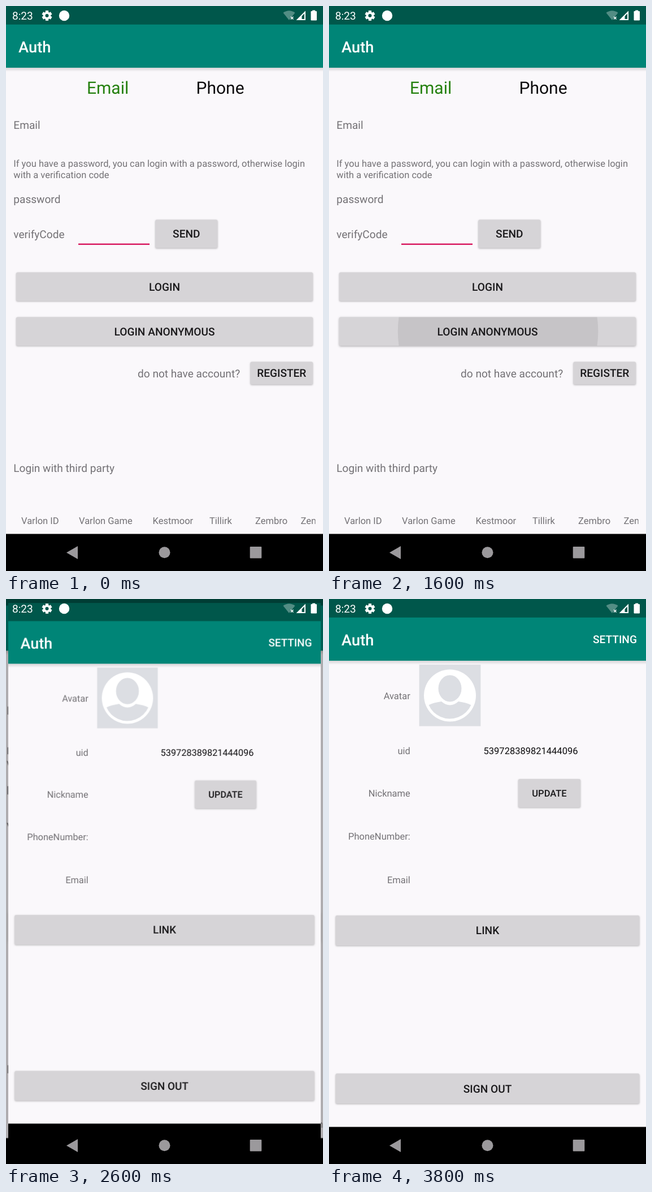
Animation, 561 px wide and 998 px high, one loop 3.9 s. Source, as an HTML page with a canvas:

```html
<!DOCTYPE html>
<html lang="en">
<head>
<meta charset="utf-8">
<title>Auth</title>
<style>
  html, body { margin: 0; width: 100%; height: 100%; overflow: hidden; background: #000; }
  canvas { display: block; }
</style>
</head>
<body>
<canvas id="stage" width="561" height="998"></canvas>
<script>
const W = 561, H = 998, LOOP = 3900, STEP = 100;
const SMALL = 16.5, BODY = 19.1;
const COLOR = {
  page: '#faf8fb', bar: '#008577', status: '#00574b', accent: '#d81b60',
  button: '#d6d4d7', label: '#737175', ink: '#19181a', avatar: '#dcdee3', nav: '#9b999c'
};
const RIPPLE_START = 1550, RIPPLE_TIME = 225;
const OPEN_START = 2442, OPEN_TIME = 400;

const stage = document.getElementById('stage').getContext('2d');
const makeLayer = () => {
  const canvas = document.createElement('canvas');
  canvas.width = W;
  canvas.height = H;
  return canvas.getContext('2d');
};
const loginLayer = makeLayer(), profileLayer = makeLayer();

const clamp = v => Math.max(0, Math.min(1, v));
const mix = (a, b, p) => a + (b - a) * p;
const cubic = (a, b, c, d, u) => {
  const v = 1 - u;
  return v * v * v * a + 3 * v * v * u * b + 3 * v * u * u * c + u * u * u * d;
};

// Solves one Bezier segment for x and returns its y.
function curve(x, xs, ys) {
  let lo = 0, hi = 1;
  for (let i = 0; i < 24; i++) {
    const mid = (lo + hi) / 2;
    if (cubic(...xs, mid) < x) lo = mid; else hi = mid;
  }
  return cubic(...ys, lo);
}
const fastOutSlowIn = x => curve(x, [0, 0.4, 0.2, 1], [0, 0, 1, 1]);
const extraSlowIn = x => x < 1 / 6
  ? curve(x, [0, 0.05, 0.1333, 1 / 6], [0, 0, 0.06, 0.4])
  : curve(x, [1 / 6, 0.2083, 0.25, 1], [0.4, 0.82, 1, 1]);

function text(c, str, x, y, size, { color = COLOR.label, align = 'left', weight = 400 } = {}) {
  c.font = `${weight} ${size}px Roboto, sans-serif`;
  c.textRendering = 'geometricPrecision';
  c.textAlign = align;
  c.fillStyle = color;
  c.fillText(str, x, y);
}

function rect(c, color, x, y, w, h) {
  c.fillStyle = color;
  c.fillRect(x, y, w, h);
}

function disc(c, color, x, y, r) {
  c.fillStyle = color;
  c.beginPath();
  c.arc(x, y, r, 0, 7);
  c.fill();
}

function polygon(c, ...points) {
  c.beginPath();
  points.forEach(([x, y]) => c.lineTo(x, y));
  c.closePath();
}

function button(c, label, x, y, w, h, { size = BODY, press = 0, ripple } = {}) {
  c.save();
  c.shadowColor = `rgba(0,0,0,${mix(0.27, 0.36, press)})`;
  c.shadowBlur = mix(3, 5, press);
  c.shadowOffsetY = mix(1, 1.8, press);
  c.fillStyle = COLOR.button;
  c.beginPath();
  c.roundRect(x, y, w, h, 2.5);
  c.fill();
  c.shadowColor = 'transparent';
  if (ripple) {
    c.clip();
    disc(c, 'rgba(0,0,0,.075)', ripple.x, y + h / 2, ripple.r);
  }
  c.restore();
  text(c, label, x + w / 2, y + h / 2 + size * 0.355, size,
    { color: COLOR.ink, align: 'center', weight: 500 });
}

function windowFrame(c) {
  rect(c, COLOR.page, 0, 0, W, H);
  const shade = c.createLinearGradient(0, 109, 0, 116);
  shade.addColorStop(0, 'rgba(0,0,0,.15)');
  shade.addColorStop(1, 'rgba(0,0,0,0)');
  rect(c, shade, 0, 109, W, 7);
  rect(c, COLOR.bar, 0, 0, W, 109);
  rect(c, COLOR.status, 0, 0, W, 32.7);
  rect(c, '#000', 0, 932.5, W, H - 932.5);
  text(c, 'Auth', 22, 81.5, 27.3, { color: '#fff', weight: 500 });
}

function drawLogin(c, t) {
  windowFrame(c);
  text(c, 'Email', 143, 155, 30, { color: '#24800e' });
  text(c, 'Phone', 336.5, 155, 30, { color: '#0c0b0d' });
  text(c, 'Email', 13.3, 217, BODY);
  text(c, 'If you have a password, you can login with a password, otherwise login', 13.3, 284, SMALL);
  text(c, 'with a verification code', 13.3, 303.5, SMALL);
  text(c, 'password', 13.3, 348, BODY);
  text(c, 'verifyCode', 13.3, 410, BODY);
  rect(c, COLOR.accent, 128, 419.5, 126, 2.5);
  if (t >= 500 && t < 1050) rect(c, COLOR.accent, 127.6, 384, 2.6, 32.5);

  button(c, 'SEND', 264.3, 377.4, 110, 50.2);
  button(c, 'LOGIN', 18, 470.5, 525, 50.5);
  const age = clamp((t - RIPPLE_START) / RIPPLE_TIME);
  const grow = fastOutSlowIn(age);
  button(c, 'LOGIN ANONYMOUS', 18, 549.5, 525, 50.5, {
    press: clamp(age * 2),
    ripple: age > 0 && { x: mix(303, 280.5, grow), r: mix(158, 268, grow) }
  });
  text(c, 'do not have account?', 233, 655.5, BODY);
  button(c, 'REGISTER', 432.5, 628.5, 110.5, 40);
  text(c, 'Login with third party', 13.3, 823, BODY);

  c.save();
  c.beginPath();
  c.rect(13, 890, 534.5, 40);
  c.clip();
  [['Varlon ID', 27], ['Varlon Game', 129], ['Kestmoor', 259.5],
   ['Tillirk', 360], ['Zembro', 441], ['Zembro Game', 521.5]]
    .forEach(([name, x]) => text(c, name, x, 914.5, SMALL));
  c.restore();
}

function drawAvatar(c) {
  rect(c, COLOR.avatar, 159.6, 116, 108.8, 108.6);
  disc(c, '#fff', 214, 170.5, 46);
  c.fillStyle = COLOR.avatar;
  c.beginPath();
  c.ellipse(214, 158, 20.5, 23.5, 0, 0, 7);
  c.fill();
  c.beginPath();
  c.arc(214, 170.5, 41, 0.42, Math.PI - 0.42);
  c.quadraticCurveTo(185, 183, 199, 181);
  c.quadraticCurveTo(214, 194, 229, 181);
  c.quadraticCurveTo(243, 183, 251.4, 187.2);
  c.fill();
}

function drawProfile(c) {
  windowFrame(c);
  text(c, 'SETTING', 506, 78.3, BODY, { color: '#fff', align: 'center', weight: 500 });
  drawAvatar(c);
  [['Avatar', 177], ['uid', 274], ['Nickname', 349], ['PhoneNumber:', 425.3], ['Email', 501.8]]
    .forEach(([name, y]) => text(c, name, 143.8, y, SMALL, { align: 'right' }));
  text(c, '539728389821444096', 357, 274, SMALL, { color: '#0c0b0d', align: 'center' });
  button(c, 'UPDATE', 335, 318, 110, 50, { size: SMALL });
  button(c, 'LINK', 11.7, 559, 537.6, 53);
  button(c, 'SIGN OUT', 11.7, 838.3, 537.6, 53);
}

function drawGear(c, x, y) {
  c.save();
  c.translate(x, y);
  for (let i = 0; i < 6; i++) {
    c.rotate(Math.PI / 3);
    rect(c, '#fff', -2.6, -8.9, 5.2, 5);
  }
  c.strokeStyle = '#fff';
  c.lineWidth = 3.8;
  c.beginPath();
  c.arc(0, 0, 4.9, 0, 7);
  c.stroke();
  c.restore();
}

function drawSystemBars(c) {
  text(c, '8:23', 11, 24, BODY, { color: '#fff' });
  drawGear(c, 72.5, 17);
  disc(c, '#fff', 103, 17, 9.2);

  c.fillStyle = 'rgba(255,255,255,.32)';
  c.beginPath();
  c.moveTo(501, 25);
  c.lineTo(490.5, 12);
  c.quadraticCurveTo(501, 4.5, 511.5, 12);
  c.closePath();
  c.fill();
  c.strokeStyle = '#fff';
  c.lineWidth = 1.5;
  c.beginPath();
  c.moveTo(504, 19);
  c.lineTo(508.5, 23.5);
  c.moveTo(508.5, 19);
  c.lineTo(504, 23.5);
  c.stroke();

  c.lineWidth = 2;
  polygon(c, [516, 24], [529, 24], [529, 11]);
  c.stroke();
  polygon(c, [516, 24], [523.5, 24], [523.5, 16.5]);
  c.fillStyle = '#fff';
  c.fill();

  rect(c, '#fff', 542.2, 7.5, 5, 3);
  c.beginPath();
  c.roundRect(539.5, 9, 10.5, 16.5, 1.2);
  c.fill();

  c.fillStyle = COLOR.nav;
  polygon(c, [107, 965.5], [127, 954], [127, 977]);
  c.fill();
  disc(c, COLOR.nav, 280.5, 965.3, 10);
  c.beginPath();
  c.roundRect(431.7, 955, 20.6, 20.6, 1);
  c.fill();
}

function place(layer, scale, alpha = 1) {
  stage.save();
  stage.globalAlpha = alpha;
  stage.translate(W / 2, H / 2);
  stage.scale(scale, scale);
  stage.drawImage(layer.canvas, -W / 2, -H / 2);
  stage.restore();
}

function render(t) {
  const age = t - OPEN_START;
  if (age < 0) {
    drawLogin(stage, t);
  } else if (age >= OPEN_TIME) {
    drawProfile(stage);
  } else {
    const p = extraSlowIn(age / OPEN_TIME);
    drawLogin(loginLayer, t);
    drawProfile(profileLayer);
    place(loginLayer, mix(1, 1.05, p));
    rect(stage, `rgba(0,0,0,${0.33 * p})`, 0, 0, W, H);
    place(profileLayer, mix(0.85, 1, p), clamp((age - 35) / 50));
    rect(stage, '#000', 0, 953, W, H - 953);
  }
  drawSystemBars(stage);
}

const begin = performance.now();
function tick() {
  const t = (performance.now() - begin) % LOOP;
  render(Math.floor(t / STEP) * STEP);
  requestAnimationFrame(tick);
}
tick();
</script>
</body>
</html>
```
